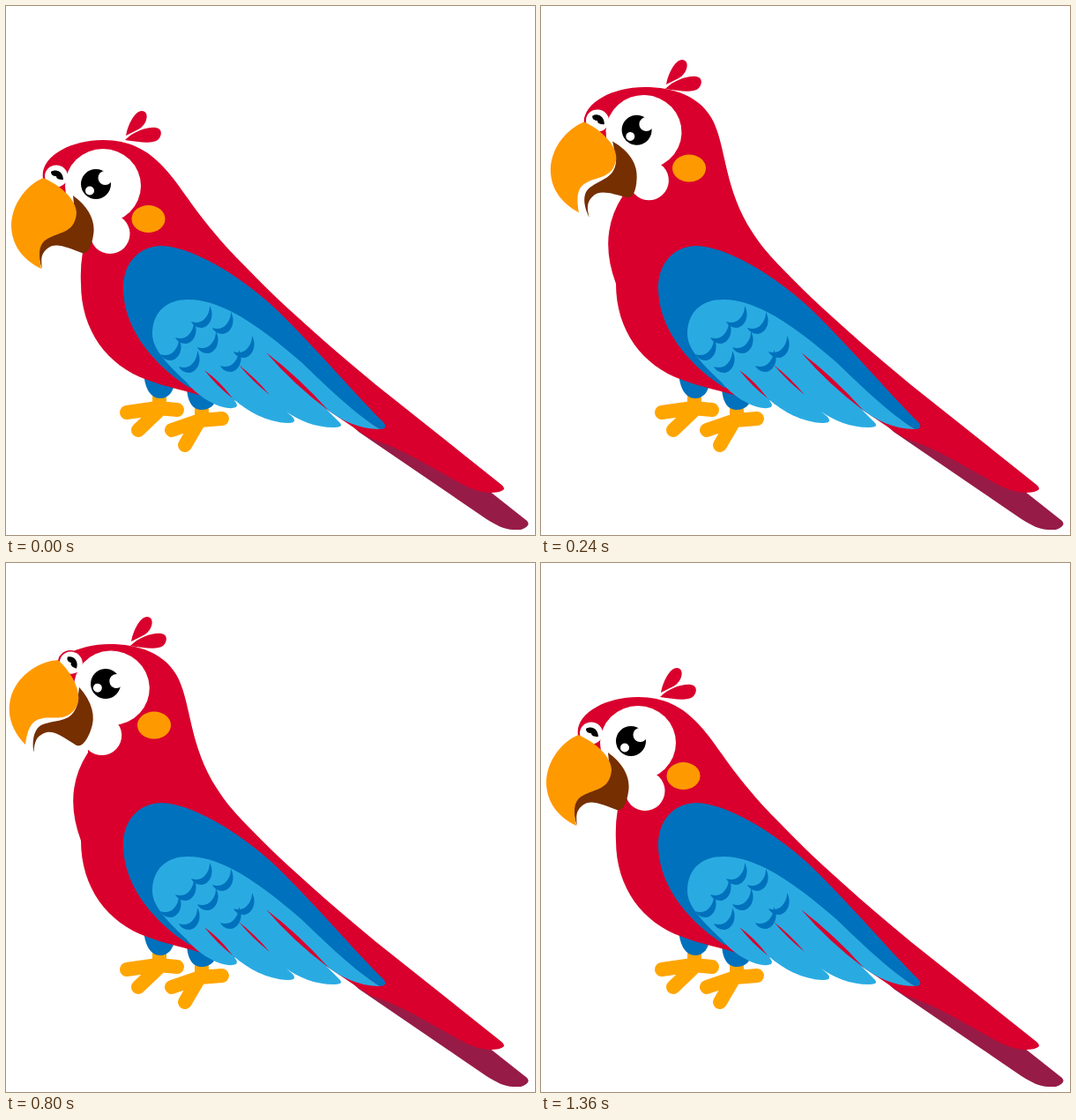
Recreate the animation shown at these times as an HTML page. Size 600x600 px, loop 1920 ms.

```html
<!DOCTYPE html>
<html lang="en">
<head>
<meta charset="utf-8">
<title>Parrot</title>
<style>
  html, body { margin: 0; height: 100%; overflow: hidden; background: #fff; }
  svg { display: block; width: 100%; height: 100%; }
  .red { fill: #d9002d; }
  .blue { fill: #0071bc; }
  .sky { fill: #29abe2; }
  .orange { fill: #ff9900; }
  .brown { fill: #752f00; }
  .white { fill: #fff; }
  .foot { fill: none; stroke: #ffa500; stroke-width: 16; stroke-linecap: round; stroke-linejoin: round; }
</style>
</head>
<body>
<svg viewBox="0 0 600 600">
  <!-- legs -->
  <path class="foot" d="M174 444V456M137 461L172 456L194 458M172 460L150 481"/>
  <path class="foot" d="M222 458V468M188 481L220 470L245 468M217 474L203 498"/>
  <path class="blue" d="M156 415C157 432 163 445 175 445C184 445 190 438 192 425Z"/>
  <path class="blue" d="M205 430C205 448 211 458 222 458C232 458 239 452 240 438Z"/>

  <!-- tail and body -->
  <path fill="#971b47" d="M375 460L400 483L545 582C556 589 566 594 575 594L584 594Q596 590 591 584L548 550Z"/>
  <path id="body" class="red"/>

  <!-- wing -->
  <path class="blue" d="M175 272C205 272 255 298 300 338C345 380 395 440 428 472Q434 479 424 480L300 400L208 433C160 402 133 360 133 320C133 292 150 273 175 272Z"/>
  <path class="sky" d="M166 372C166 345 185 332 208 333C250 333 300 374 335 404C362 430 395 462 424 480C400 480 380 470 362 456L378 472Q384 478 372 478C350 478 332 470 318 460L325 466Q331 473 320 473C295 472 275 460 258 446L261 450Q265 457 252 456C235 454 215 440 205 427C185 408 166 390 166 372Z"/>
  <path class="red" d="M225 413Q243 426 257 445Q239 431 225 413ZM264 407Q283 422 299 441Q280 426 264 407ZM295 393Q332 421 366 459Q327 430 295 393Z"/>
  <g id="scales" class="blue"></g>

  <!-- head -->
  <g id="crest" class="red">
    <path d="M136 147C138 135 146 119 154 119C163 119 161 134 150 140Z"/>
    <path d="M135 152C145 142 160 137 170 138C178 139 177 148 172 152C165 157 150 154 135 152Z"/>
  </g>
  <ellipse id="cheek" class="orange" cx="161.500" cy="241.500" rx="19" ry="15.500"/>
  <g id="face">
    <ellipse class="red" cx="57" cy="193" rx="15" ry="14"/>
    <ellipse class="white" cx="57" cy="193" rx="13" ry="12.500"/>
    <path d="M51 188C57 184 65 188 65 197C60 197 57 196 57 193C54 193 51 192 51 188Z"/>
    <ellipse class="white" cx="110" cy="204" rx="43" ry="42"/>
    <circle class="white" cx="106" cy="242" r="14"/>
    <circle class="white" cx="118" cy="258.500" r="22.500"/>
    <circle cx="102" cy="202" r="17"/>
    <circle class="white" cx="112.500" cy="195" r="8"/>
    <circle class="white" cx="95" cy="209.500" r="5"/>
    <path id="jaw" class="brown" d="M76 215C94 228 102 244 99 260C97 274 92 282 86 280C70 274 56 267 47 275C41 280 39 285 41 298C36 285 35 270 46 264C60 256 76 256 78 235Z"/>
    <path class="orange" d="M42 195C24 203 6 224 6 250C7 276 24 290 40 298C37 283 36 270 47 264C60 256 78 258 80 235C80 220 62 203 42 195Z"/>
  </g>
</svg>
<script>
const LOOP = 1920, STEP = 80;
const part = id => document.getElementById(id);

// Crescents on the wing, each placed by its upper right tip
const scaleTips = [[231, 340], [213, 358], [196, 377], [255, 347], [238, 369], [217, 391], [279, 374], [264, 390]];
part('scales').innerHTML = scaleTips.map(([x, y]) =>
  `<path d="M${x} ${y}c6 10 1 24 -9 25c-6 0 -10 -3 -12 -7c6 2 12 1 16 -4c4 -5 5 -9 5 -14z"/>`).join('');

// Smooth 0 to 1 between two times
function ramp(t, from, to) {
  const u = Math.min(1, Math.max(0, (t - from) / (to - from)));
  return u * u * (3 - 2 * u);
}

// The neck stretches from the lowered outline to the raised one
function bodyPath(lift) {
  const at = (x0, y0, x1, y1) => `${x0 + (x1 - x0) * lift} ${y0 + (y1 - y0) * lift} `;
  const head = (x, y) => at(x, y, x + 7, y - 60);
  return 'M' + head(42, 196) +
    'C' + head(38, 171) + head(73, 152) + head(110, 152) +
    'C' + at(140, 152, 150, 92) + at(160, 163, 182, 102) + at(178, 182, 196, 132) +
    'C' + at(201, 206, 214, 172) + at(217, 241, 206, 228) + '268 292' +
    'C281 305 294 319 308 332C340 362 380 397 420 430L562 543Q568 548 562 550' +
    'C550 555 530 550 515 541C485 525 450 502 412 490L360 455L230 445' +
    'C205 436 180 432 160 424C115 408 85 368 85 315' +
    'Q' + at(84, 297, 64, 259) + at(87, 279, 93, 215) +
    'L' + head(85, 225) + 'Z';
}

function draw(now) {
  const t = Math.floor(now % LOOP / STEP) * STEP;
  const lift = ramp(t, 0, 240) - ramp(t, 1040, 1360);
  const tilt = ramp(t, 160, 400) - ramp(t, 1200, 1360);
  const open = ramp(t, 0, 160) - ramp(t, 480, 640) + ramp(t, 640, 800) - ramp(t, 1120, 1280);
  const eyeX = 102 + 11 * Math.max(lift * 0.6, tilt);
  const eyeY = 202 - 60 * lift - 5 * tilt;
  // The head dips slightly while rising, before it leans back
  const angle = 20 * tilt - 4 * lift * (1 - tilt);

  part('body').setAttribute('d', bodyPath(lift));
  part('crest').setAttribute('transform', `translate(${6 * lift} ${-58 * lift})`);
  part('cheek').setAttribute('transform', `translate(${6.5 * lift} ${-57.5 * lift})`);
  part('face').setAttribute('transform', `translate(${eyeX} ${eyeY}) rotate(${angle}) translate(-102 -202)`);
  part('jaw').setAttribute('transform', `rotate(${-8 * open} 82 222)`);
}

const start = performance.now();
function tick() {
  draw(performance.now() - start);
  requestAnimationFrame(tick);
}
tick();
</script>
</body>
</html>
```
